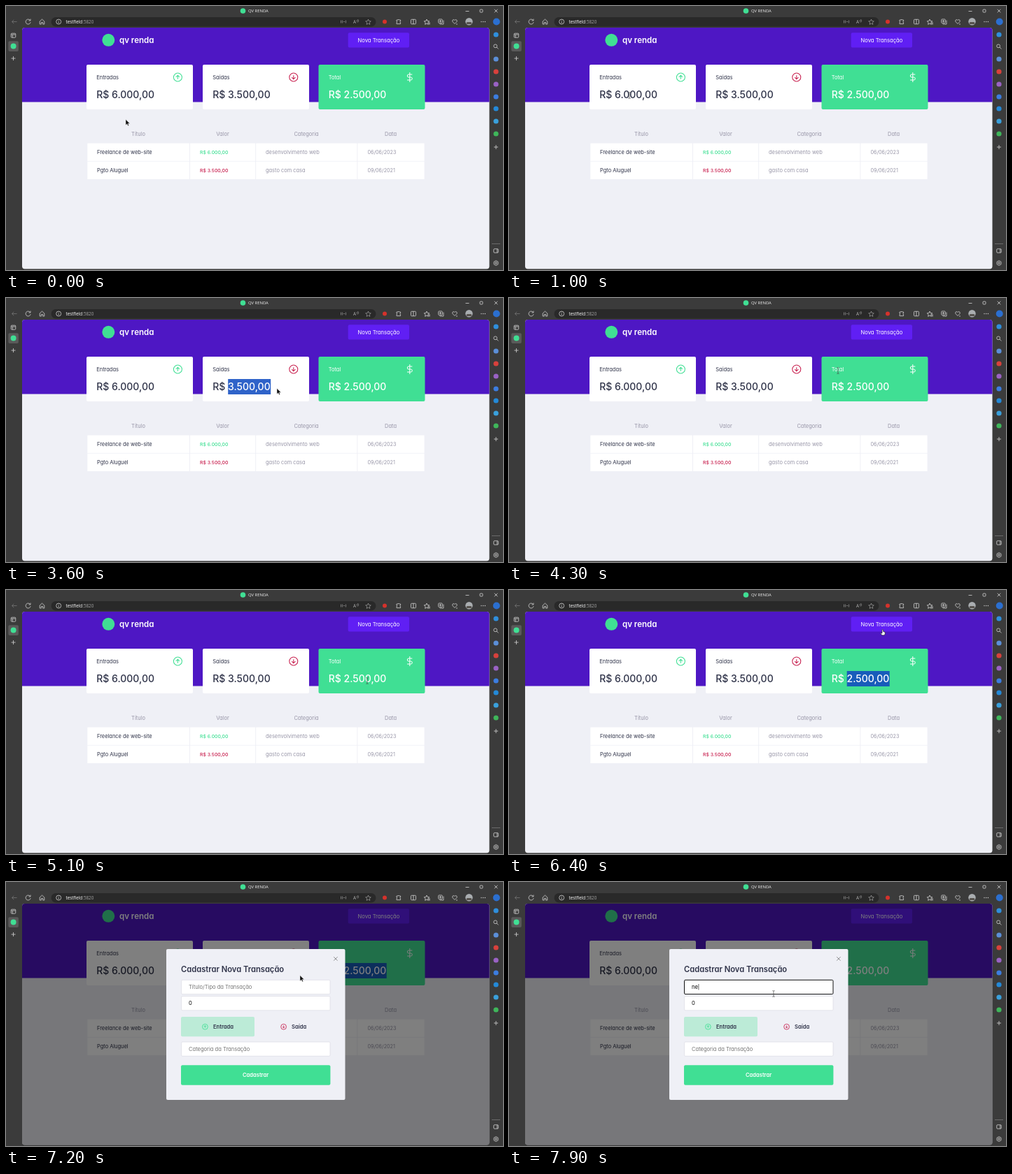
An HTML page that plays this animation: 710 px wide and 378 px high, repeating every 8000 ms.

```html
<!DOCTYPE html>
<html lang="pt-BR">
<head>
<meta charset="utf-8">
<title>QV RENDA</title>
<style>
  html, body { margin: 0; width: 100%; height: 100%; overflow: hidden; background: #3b3b3b; }
  svg { display: block; width: 710px; height: 378px; }
  text { font-family: Inter, "Noto Sans", sans-serif; font-feature-settings: "cv11"; white-space: pre; }
  .ui { font-family: "Open Sans", "Noto Sans", sans-serif; }
  .line { fill: none; stroke: #d4d4d4; stroke-width: .8; }
</style>
</head>
<body>
<svg id="stage" viewBox="0 0 710 378"></svg>
<script>
const GREEN = '#40df94', RED = '#c8204f', INK = '#2f3349', MUTED = '#9896a8', PAGE = '#eff0f6';

const rect = (x, y, w, h, fill, r = 0, more = '') =>
  `<rect x="${x}" y="${y}" width="${w}" height="${h}" rx="${r}" fill="${fill}" ${more}/>`;
const dot = (x, y, r, fill) => `<circle cx="${x}" cy="${y}" r="${r}" fill="${fill}"/>`;
const text = (x, y, size, fill, str, more = '') =>
  `<text x="${x}" y="${y}" font-size="${size}" fill="${fill}" ${more}>${str}</text>`;
const line = (d, more = '') => `<path class="line" d="${d}" ${more}/>`;
const MID = 'text-anchor="middle" ', MEDIUM = 'font-weight="500" ', SEMI = 'font-weight="600" ';

// Circled arrow: dir is -1 for up, 1 for down
const arrowIcon = (x, y, r, color, dir) => {
  const a = r * .45 * dir;
  return `<g fill="none" stroke="${color}" stroke-width="${r * .1 + .45}"><circle cx="${x}" cy="${y}" r="${r}"/>
    <path d="M${x} ${y - a}V${y + a}M${x - r * .45} ${y}L${x} ${y + a}L${x + r * .45} ${y}"/></g>`;
};

function chrome() {
  const apps = [[41, '#2f8fdc'], [76, '#5b8fd8'], [94, '#d8413c'], [112, '#9a62c4'], [130, '#3c7de0'],
    [147, '#2489d8'], [165, '#3aa0dc'], [183, '#3fb65a']];
  const star = (x, y, more) =>
    line(`M${x} ${y - 3.8}l1.1 2.5 2.7.3-2 1.9.5 2.7-2.3-1.4-2.3 1.4.5-2.7-2-1.9 2.7-.3z`, more);
  const plus = (x, y) => line(`M${x - 3} ${y}h6m-3-3v6`);
  const box = (x, y, w, h) => rect(x - w / 2, y - h / 2, w, h, 'none', 1, 'stroke="#d4d4d4" stroke-width=".8"');
  return rect(0, 0, 710, 378, '#3b3b3b') +
    dot(338.5, 7, 3.8, GREEN) + text(346, 9.3, 5.9, '#f0f0f0', 'QV RENDA', 'class="ui"') +
    line('M656.5 7.5h5M697.7 4.7l4.6 4.6m0-4.6l-4.6 4.6') + box(679, 7, 4, 4) +
    line('M15.5 22.5h-7m2.7-2.7l-2.7 2.7 2.7 2.7', 'style="stroke:#777"') +
    line('M34.6 20.6a3.5 3.5 0 1 0 .5 2.6M35 18.5v2.4h-2.4') +
    line('M48.2 22l3.3-3 3.3 3v4h-2.2v-2.5h-2.2v2.5h-2.2z') +
    rect(64.5, 16, 464, 13.5, '#292929', 6.7) +
    line('M71.7 22.5a3.5 3.5 0 1 0 7 0a3.5 3.5 0 1 0-7 0M75.2 22v2.5m0-4.2v.8') +
    text(85.5, 24.8, 6.3, '#fff', 'testfield<tspan fill="#a5a5a5">:5820</tspan>', 'class="ui"') +
    line('M478.5 20.5v4m2-4v4m5-4v4M482 22.5h2', 'opacity=".6"') +
    text(496, 25, 6.5, '#aaa', 'A', 'class="ui"') + line('M501 20q1.5 1 0 2.5m1.5-3.5q2.3 2 0 4.5', 'opacity=".6"') +
    star(517.5, 22.8, 'opacity=".6"') + dot(541, 22.5, 3, '#d5322c') +
    line('M558 20h2q.8-2 1.6 0h2v2q-2 .8 0 1.6v2h-5.6v-2q2-.8 0-1.6z') +
    box(582, 22.5, 7, 6.5) + line('M582 19v7') +
    star(601, 22.8) + line('M603 24h3m-2 1.8h2') +
    box(620.5, 21.7, 5.5, 5.5) + line('M619.5 26h5.5v-5.5M620.5 20v3.4m-1.7-1.7h3.4') +
    line('M641 25.5l-3-3q-1-2.5 1.3-3 1.2 0 1.7 1 .5-1 1.7-1 2.3.5 1.3 3zM643 26h2') +
    dot(661.5, 22.3, 5.2, '#a9adb0') + rect(657.7, 23, 7.6, 3, '#55514c', 1.5) +
    [679, 681.7, 684.4].map(x => dot(x, 22.5, .7, '#d4d4d4')).join('') +
    dot(700.7, 22.5, 5, '#2b6fd0') +
    box(10.5, 42.2, 6.5, 6) + line('M7.5 41h6M9.3 41v4') +
    rect(3.3, 50.3, 14.6, 14.6, '#5a5a5a', 2) + dot(10.6, 57.5, 4, GREEN) + plus(10.5, 75) +
    apps.map(([y, c]) => dot(700, y, 3.6, c)).join('') +
    line('M696.7 57.3a2.4 2.4 0 1 0 4.8 0a2.4 2.4 0 1 0-4.8 0M700.9 59l2.5 2.5') + plus(700, 202) +
    line('M694 340.5h12', 'opacity=".4"') +
    box(700, 350.5, 6.5, 5.5) + line('M701.7 348v5') +
    line('M700 364.6l3 1.7v3.5l-3 1.7-3-1.7v-3.5zM698.7 368a1.3 1.3 0 1 0 2.6 0a1.3 1.3 0 1 0-2.6 0');
}

function card(x, label, value, id, bg, ink, mark) {
  return rect(x, 84, 152, 64, bg, 2) + text(x + 14.2, 104.6, 7.5, ink, label) +
    rect(x + 36.2, 116, 61, 22, mark, 0, `id="${id}Box" visibility="hidden"`) +
    text(x + 14.2, 132.1, 14, ink, `R$ <tspan id="${id}">${value}</tspan>`, MEDIUM);
}

function page() {
  const heads = [[189, 'Título'], [309.5, 'Valor'], [429, 'Categoria'], [549.5, 'Data']];
  const cols = [[116.3, 145.6], [263, 93.2], [357.2, 144.2], [502.4, 95.2]];
  const row = (y, name, value, color, kind, date) =>
    cols.map(([x, w]) => rect(x, y, w, 25.3, '#fff')).join('') +
    text(130, y + 15.3, 7.45, INK, name) + text(277, y + 15.3, 6.85, color, value, MEDIUM) +
    text(371, y + 15.3, 7.45, MUTED, kind) + text(516.5, y + 15.3, 7.2, MUTED, date);
  return rect(23, 31, 667.5, 345.5, PAGE, 4) +
    `<path d="M23 137.5V35q0-4 4-4H686.5q4 0 4 4v102.5z" fill="#4e17c4"/>` +
    dot(146.3, 48.8, 9, GREEN) + text(162, 52.6, 11.5, '#fff', 'qv renda', SEMI) +
    rect(488.7, 38.3, 87.3, 21.2, '#601ff4', 2) + text(532.4, 51.6, 7.6, '#fff', 'Nova Transação', MID) +
    card(115, 'Entradas', '6.000,00', 'in', '#fff', INK, '#2f63c9') +
    card(281, 'Saídas', '3.500,00', 'out', '#fff', INK, '#2f63c9') +
    card(446.5, 'Total', '2.500,00', 'sum', GREEN, '#fff', '#185cba') +
    arrowIcon(245.4, 102, 6, GREEN, -1) + arrowIcon(410.8, 102, 6, RED, 1) +
    line('M576.8 95v14M580.3 98h-5a2 2 0 0 0 0 4h3a2 2 0 0 1 0 4h-5.2', 'style="stroke:#fff;stroke-width:1"') +
    heads.map(([x, s]) => text(x, 185.6, 7.5, MUTED, s, MID)).join('') +
    row(196.6, 'Freelance de web-site', 'R$ 6.000,00', GREEN, 'desenvolvimento web', '06/06/2023') +
    row(222.7, 'Pgto Aluguel', 'R$ 3.500,00', RED, 'gasto com casa', '09/06/2021');
}

function modal() {
  const field = (y, str, color, ids = ['', '']) =>
    rect(250.5, y, 212.5, 20.3, '#fff', 1.5, `stroke="#d5d6df" stroke-width=".6" id="${ids[0]}"`) +
    text(261, y + 12.5, 7.55, color, str, `id="${ids[1]}"`);
  return rect(23, 31, 667.5, 345.5, '#000', 4, 'opacity=".5"') +
    rect(229, 96, 255.5, 216, PAGE, 2) +
    line('M468.2 107.2l5.4 5.4m0-5.4l-5.4 5.4', 'style="stroke:#777"') +
    text(250, 128.8, 11.2, INK, 'Cadastrar Nova Transação', SEMI) +
    field(163.5, '0', '#000') + field(140.3, '', '#757575', ['field', 'entry']) +
    rect(250, 193, 105, 28.3, '#bcebd7', 2) +
    arrowIcon(284.4, 207.3, 3.9, GREEN, -1) + text(296, 209.8, 7.6, INK, 'Entrada', SEMI) +
    arrowIcon(396.6, 207.3, 3.9, RED, 1) + text(408, 209.8, 7.6, INK, 'Saída', SEMI) +
    field(229, 'Categoria da Transação', '#757575') +
    rect(250, 262.3, 213.4, 28.5, GREEN, 2) + text(356.6, 279, 7.6, '#fff', 'Cadastrar', MID + SEMI) +
    line('M270.9 146v8.5', 'id="caret" style="stroke:#000;stroke-width:.6"');
}

const cursors = {
  arrow: '<path d="M0 0v8l1.9-1.7 1.3 2.8 1.3-.6-1.3-2.8h2.6z" fill="#111" stroke="#eee" stroke-width=".4"/>',
  beam: '<path d="M-1.6-4.4q1.6 0 1.6.7v7.4q0 .7-1.6.7M1.6-4.4q-1.6 0-1.6.7m0 7.4q0 .7 1.6.7" fill="none" stroke="#444" stroke-width=".7"/>',
  hand: '<path d="M-.8.5q.8-1 1.6 0v2.6l2.6.7v2.6l-1 1.9h-3.4l-2-2.8.6-.7 1.6.9z" fill="#fff" stroke="#111" stroke-width=".6"/>'
};

const $ = id => document.getElementById(id);
$('stage').innerHTML = chrome() + page() + `<g id="modal">${modal()}</g>` +
  Object.entries(cursors).map(([id, shape]) => `<g id="${id}">${shape}</g>`).join('');

// Pointer path: time, x, y
const path = [
  [0, 171, 162.5], [700, 171, 162.5], [1000, 172, 128], [1800, 172, 128], [2100, 178, 132], [2200, 178, 132],
  [3000, 318, 129], [3100, 318, 129], [3300, 345, 130], [3400, 345, 130], [3600, 387, 129.5], [4000, 470, 104],
  [4400, 470, 104], [4800, 521, 131], [4900, 521, 131], [5100, 516, 130], [5800, 516, 130],
  [6400, 533.8, 56.5], [6500, 531, 55.5], [6700, 525, 68], [7400, 378, 160], [8000, 378, 160]
];

function pointer(t) {
  const i = path.findIndex(p => p[0] > t);
  const [t0, x0, y0] = path[i - 1], [t1, x1, y1] = path[i];
  const k = (t - t0) / (t1 - t0);
  return [x0 + (x1 - x0) * k, y0 + (y1 - y0) * k];
}

function pointerKind(x, y, open) {
  const over = (l, r, top, bottom) => x >= l && x <= r && y >= top && y <= bottom;
  if (open) return over(250, 463, 140, 161) ? 'beam' : 'arrow';
  if (over(489, 576, 38, 60)) return 'hand';
  const onText = [129, 295, 461].some(l => over(l, l + 83, 116, 138) || over(l, l + 22, 97, 109));
  return onText ? 'beam' : 'arrow';
}

const show = (id, on) => $(id).setAttribute('visibility', on ? 'visible' : 'hidden');

function select(id, on, ink) {
  show(id + 'Box', on);
  $(id).setAttribute('fill', on ? '#fff' : ink);
}

function draw(t) {
  const open = t >= 6500, focus = t >= 7400, typed = t >= 7900 ? 'ne' : t >= 7800 ? 'n' : '';
  select('out', t >= 3300 && t < 4300, INK);
  select('sum', t >= 5300 && t < 7400, '#fff');

  $('modal').style.display = open ? '' : 'none';
  $('field').setAttribute('stroke', focus ? '#101010' : '#d5d6df');
  $('field').setAttribute('stroke-width', focus ? 1 : .6);
  $('entry').textContent = typed || 'Título/Tipo da Transação';
  $('entry').setAttribute('fill', typed ? '#000' : '#757575');
  $('caret').setAttribute('transform', `translate(${(typed.length - 2) * 4.6})`);
  show('caret', typed);

  const [x, y] = pointer(t), kind = pointerKind(x, y, open);
  for (const id in cursors) show(id, id === kind);
  $(kind).setAttribute('transform', `translate(${x} ${y})`);
}

// The screen refreshes ten times a second
function tick(now) {
  draw(Math.floor(now % 8000 / 100) * 100);
  requestAnimationFrame(tick);
}
draw(0);
requestAnimationFrame(tick);
</script>
</body>
</html>
```
